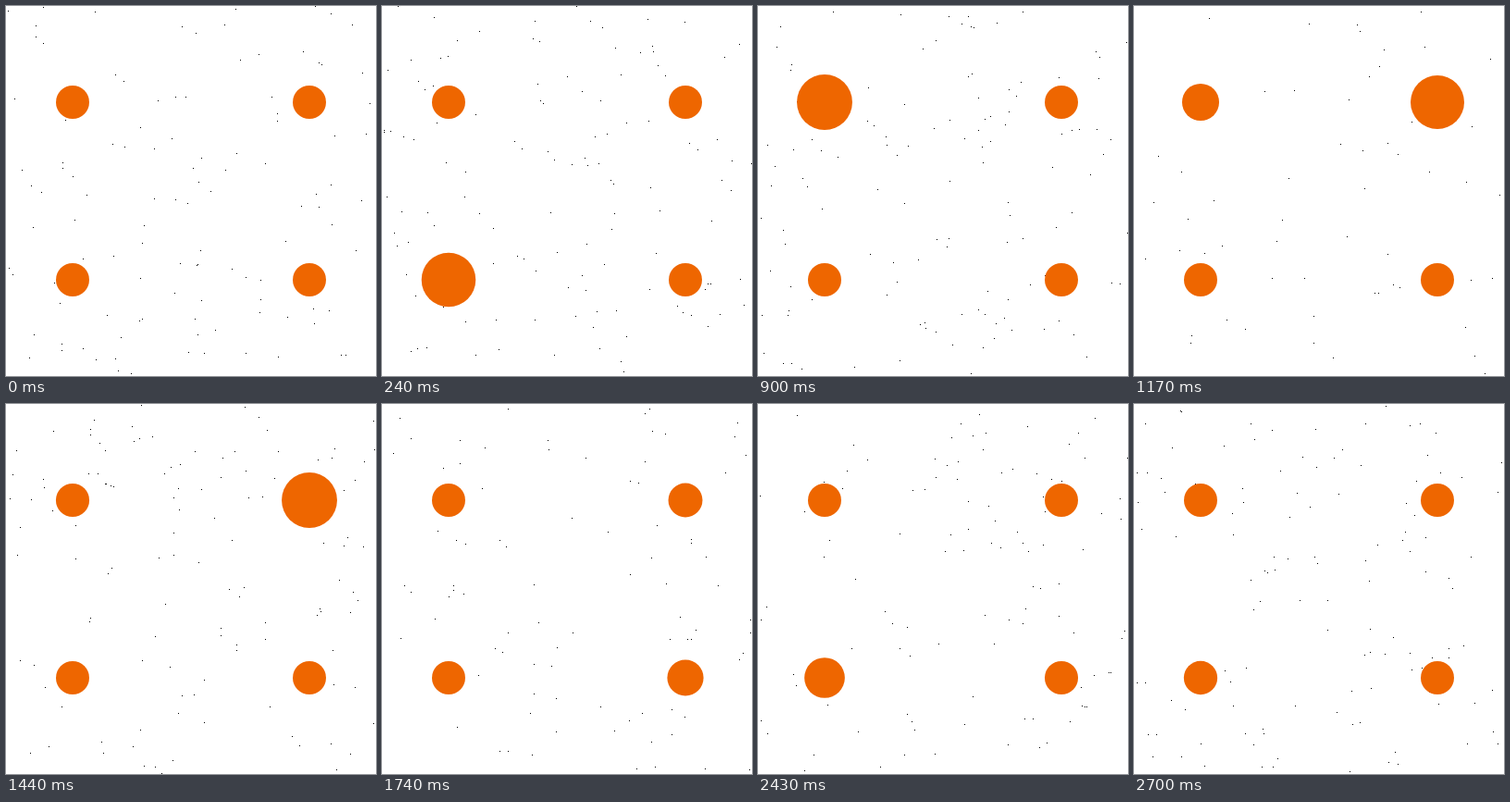
These frames come from a looping animation (400x400 px, 2.73 s). An HTML page with a canvas:

```html
<!DOCTYPE html>
<html lang="en">
<head>
<meta charset="utf-8">
<title>Pulsing dots</title>
<style>
  html, body { margin: 0; width: 100%; height: 100%; overflow: hidden; background: #fff; }
  canvas { display: block; width: 400px; height: 400px; }
</style>
</head>
<body>
<canvas id="stage" width="400" height="400"></canvas>
<script>
const ctx = document.getElementById('stage').getContext('2d');
const STEP = 30, STEPS = 91;
const REST = 18, SWELL = 12, EASE = 0.7;

// Each pulse is [start, end] in steps: swell while active, then relax.
const dots = [
  { x: 72,  y: 296, pulses: [[0, 12], [70.2, 78]] },
  { x: 72,  y: 104, pulses: [[14, 34]] },
  { x: 328, y: 104, pulses: [[32, 49]] },
  { x: 328, y: 296, pulses: [[57.6, 64.5]] }
];

function swell(t, [start, end]) {
  if (t <= start) return 0;
  const grown = 1 - EASE ** (Math.min(t, end) - start);
  return SWELL * grown * EASE ** Math.max(0, t - end);
}

function seeded(seed) {
  let s = Math.imul(seed + 1, 0x9E3779B1);
  return () => {
    s = (s + 0x6D2B79F5) | 0;
    let v = Math.imul(s ^ (s >>> 15), s | 1);
    v ^= v + Math.imul(v ^ (v >>> 7), v | 61);
    return ((v ^ (v >>> 14)) >>> 0) / 4294967296;
  };
}

function drawSpecks(step) {
  const rnd = seeded(step);
  const count = 50 + rnd() * 110;
  ctx.fillStyle = '#000';
  for (let i = 0; i < count; i++) {
    ctx.fillRect(Math.floor(rnd() * 400), Math.floor(rnd() * 400), 1, 1);
  }
}

function draw(step) {
  ctx.fillStyle = '#fff';
  ctx.fillRect(0, 0, 400, 400);
  drawSpecks(step);
  ctx.fillStyle = '#ee6600';
  for (const { x, y, pulses } of dots) {
    const r = pulses.reduce((sum, p) => sum + swell(step, p), REST);
    ctx.beginPath();
    ctx.arc(x, y, r, 0, Math.PI * 2);
    ctx.fill();
  }
}

const begin = performance.now();
let last = -1;
function tick() {
  const step = Math.floor((performance.now() - begin) / STEP) % STEPS;
  if (step !== last) draw(last = step);
  requestAnimationFrame(tick);
}
tick();
</script>
</body>
</html>
```
